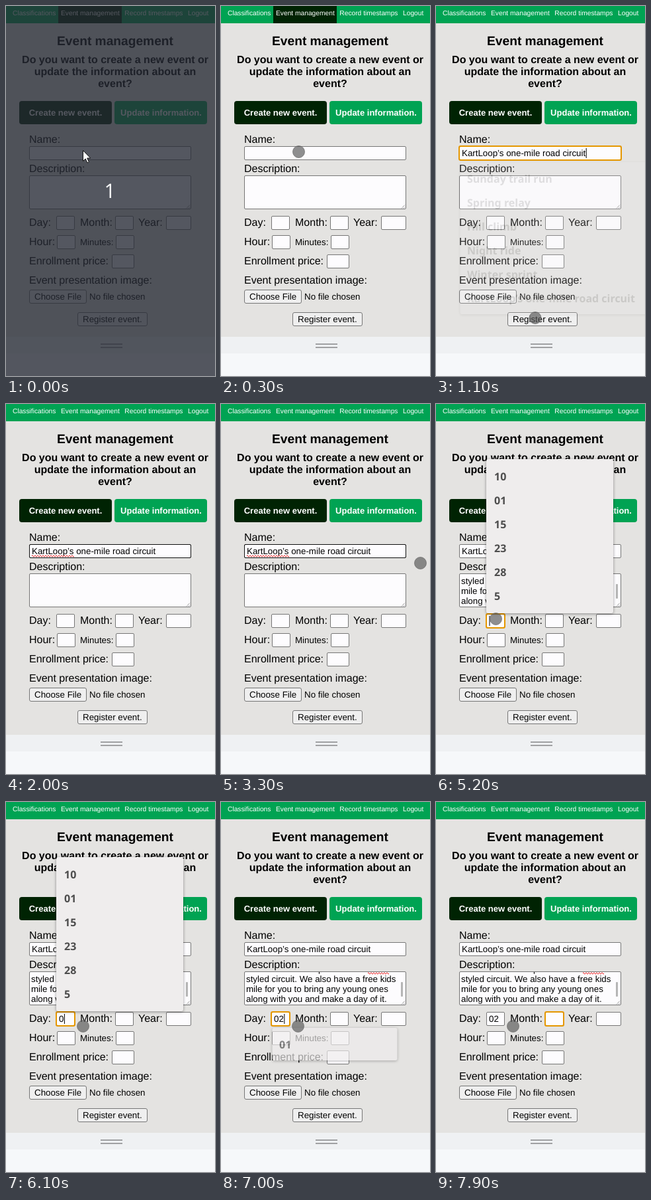
Write an HTML page that moves like this. It is 316x557 px and loops after 8 s.

```html
<!DOCTYPE html>
<html lang="en">
<head>
<meta charset="utf-8">
<title>Event management</title>
<style>
html, body { margin: 0; width: 316px; height: 557px; overflow: hidden; background: #e4e3e1; }
svg { display: block; font: 13.333px "Liberation Sans", Arial, sans-serif; text-rendering: geometricPrecision; }
.nav { font-size: 10.24px; fill: #fff; }
.head { font-size: 16px; font-weight: bold; text-anchor: middle; }
.tab { font-size: 13px; font-weight: bold; fill: #fff; text-anchor: middle; }
.label { font-size: 16px; }
.field rect { fill: #fdfcfe; stroke: #767676; }
.button rect { fill: #efefef; stroke: #767676; }
.list text { font: 600 16px "Noto Sans", "Open Sans", sans-serif; fill: #4d4d4d; }
.list rect { fill: #efeded; filter: drop-shadow(0 1px 2px #0006); }
.ring { fill: none; stroke: #e59700; stroke-width: 2; }
.ring.idle { stroke: #101010; stroke-width: 1; }
.touch { fill: #555; fill-opacity: .66; stroke: #666; stroke-opacity: .7; }
.count { font: 30px "Open Sans", "Noto Sans", sans-serif; fill: #fff; text-anchor: middle; }
</style>
</head>
<body>
<svg width="316" height="557" viewBox="0 0 316 557">
  <defs><clipPath id="area"><rect x="36" y="256" width="243" height="49"/></clipPath></defs>
  <rect width="316" height="557" fill="#e4e3e1"/>
  <rect width="316" height="26" fill="#00a353"/>
  <rect id="hover" x="79" width="96" height="26" fill="#002303"/>
  <g class="nav">
    <text x="10" y="14">Classifications</text>
    <text x="83" y="14">Event management</text>
    <text x="179.3" y="14">Record timestamps</text>
    <text x="275" y="14">Logout</text>
  </g>
  <g class="head">
    <text x="165" y="59" font-size="19.2">Event management</text>
    <text x="165" y="86">Do you want to create a new event or</text>
    <text x="165" y="104">update the information about an</text>
    <text x="165" y="122">event?</text>
  </g>
  <rect x="20" y="143" width="140" height="35" rx="4" fill="#002303"/>
  <rect x="164" y="143" width="140" height="35" rx="4" fill="#00a353"/>
  <g class="tab">
    <text x="90" y="165">Create new event.</text>
    <text x="234.5" y="165">Update information.</text>
  </g>
  <g class="label">
    <text x="35" y="206">Name:</text>
    <text x="35" y="250">Description:</text>
    <text x="35" y="331">Day:</text>
    <text x="112" y="331">Month:</text>
    <text x="200" y="331">Year:</text>
    <text x="35" y="360">Hour:</text>
    <text x="35" y="389">Enrollment price:</text>
    <text x="35" y="418">Event presentation image:</text>
  </g>
  <text x="112" y="360">Minutes:</text>
  <g class="field" id="fields"></g>
  <path d="M273 304.500l5-5M276 304.500l2-2" stroke="#999"/>
  <g class="button">
    <rect x="35.500" y="427.500" width="86" height="20" rx="2.500"/>
    <rect x="108.500" y="461.500" width="105" height="20" rx="2.500"/>
  </g>
  <text x="43" y="442">Choose File</text>
  <text x="126" y="442">No file chosen</text>
  <text x="116" y="476">Register event.</text>
  <rect y="498" width="316" height="25" fill="#eff1f3"/>
  <rect y="523" width="316" height="34" fill="#f6f8fa"/>
  <path d="M143 509h33M143 514h33" stroke="#a0a1a3" stroke-width="2"/>
  <g id="live"></g>
</svg>
<script>
const LOOP = 8000, TICK = 100, LINE = 15;
const box = (x, y, w, h = 21) => ({ x, y, w, h });
const inRow = (row, x, w = 28) => box(x, 316 + 29 * row, w);
const fields = {
  name: box(35, 211, 245), about: box(35, 255, 245, 51),
  day: inRow(0, 76), month: inRow(0, 165), year: inRow(0, 242, 38),
  hour: inRow(1, 77), minutes: inRow(1, 166), price: inRow(2, 160, 34)
};
const title = "KartLoop’s one-mile road circuit";
const about = `styled circuit. We also have a free kids
mile for you to bring any young ones
along with you and make a day of it.`;
const events = ["Sunday trail run", "Spring relay", "Hill climb", "Night ride", "Winter sprint", title];
const days = ["10", "01", "15", "23", "28", "5"];

// Each edit focuses a field and may set its text.
const edits = [[600, "name"], [1000, "name", title], [3500, "name"], [3800, "about"],
  [3900, "about", about], [5200, "day"], [6100, "day", "0"], [7000, "day", "02"], [7400, "month"]];
const taps = [[300, 117.5, 219.5], [600, 150, 469.5], [3300, 301.5, 239.5], [3600, 176.5, 265.5],
  [4400, 89.5, 346.5], [4700, 90, 337.5], [5200, 90.5, 323.5], [5800, 116.5, 337.5]];

const el = id => document.getElementById(id);
const during = (t, from, to) => t >= from && t < to;
const rect = (x, y, w, h, more = "") => `<rect x="${x}" y="${y}" width="${w}" height="${h}" ${more}/>`;
const text = (x, y, s, more = "") => `<text x="${x}" y="${y}" ${more}>${s}</text>`;

const pen = document.createElement("canvas").getContext("2d");
pen.font = '13.333px "Liberation Sans", Arial, sans-serif';
const widthOf = s => pen.measureText(s).width;

// Text starts a little closer to the edges in the multi-line field.
const origin = (name, { x, y } = fields[name]) =>
  name === "about" ? [x + 3, y + 16] : [x + 4, y + 15];

function lines(name, value) {
  const [x, y] = origin(name);
  return value.split("\n").map((s, i) => text(x, y + LINE * i, s)).join("");
}

function caret(name, value) {
  const [x, y] = origin(name), rows = value.split("\n");
  return rect(x + widthOf(rows.at(-1)) + .5, y - 12 + LINE * (rows.length - 1), 1, LINE);
}

function squiggle(x, y, w) {
  const waves = "q1 -2.500 2 0t2 0".repeat(Math.round(w / 4));
  return `<path d="M${x} ${y}${waves}" fill="none" stroke="#e33"/>`;
}

function ring({ x, y, w, h }, idle) {
  return idle
    ? rect(x + .5, y + .5, w - 1, h - 1, 'rx="1.500" class="ring idle"')
    : rect(x, y, w, h, 'rx="2" class="ring"');
}

// A suggestion list stays solid, then fades out quickly.
function list(t, start, close, field, items, { w = 192, above = false } = {}) {
  const opacity = t < start ? 0 : t < close ? 1 : Math.max(0, .67 - (t - close) / 200);
  if (!opacity) return "";
  const h = 36 * items.length + 16, inset = opacity < 1 ? 1.5 : 0;
  const y = above ? field.y - 1 - h : field.y + field.h + 1.5;
  return `<g class="list" opacity="${opacity}">` +
    rect(field.x + inset, y + inset, w - 2 * inset, h - 2 * inset, 'rx="3"') +
    items.map((s, i) => text(field.x + 12, y + 32 + 36 * i, s)).join("") + "</g>";
}

function description(value, checked) {
  return '<g clip-path="url(#area)">' + text(147, 256, "p") + lines("about", value) +
    (checked ? squiggle(222, 258, 30) : "") + "</g>" + rect(272, 271, 3, 22, 'rx="1" fill="#b5b5b5"');
}

function inputs(t) {
  const away = during(t, 1700, 3500), values = {};
  let s = "", since, active;
  for (const [time, name, value] of edits) {
    if (time > t) break;
    [since, active] = [time, name];
    if (value) values[name] = value;
  }
  for (const [name, value] of Object.entries(values))
    s += name === "about" ? description(value, active !== name) : lines(name, value);
  if (away && t >= 2000) s += squiggle(39, 229, widthOf(title.split(" ")[0]));
  if (active) s += ring(fields[active], away);
  if (active && !away && (t - since) % 1000 < 500) s += caret(active, values[active] || "");
  return s;
}

function touch(t) {
  const tap = taps.findLast(([time]) => time <= t);
  if (!tap || during(t, 1700, 3300)) return "";
  return `<circle class="touch" cx="${tap[1]}" cy="${tap[2]}" r="9"/>`;
}

const countdown = rect(0, 0, 316, 557, 'fill="#262a34" opacity=".78"') +
  text(157, 289, "1", 'class="count"') +
  '<path d="M116.500 217.500v16l3.700-3.500 2.800 6 2.400-1.100-2.700-5.900h5z" fill="#fff" stroke="#111"/>';

function scene(t) {
  let s = inputs(t) + list(t, 600, 1000, fields.name, events, { w: 286 });
  if (t < 6300) s += list(t, 5200, 6300, fields.day, days, { above: true });
  s += list(t, 6300, 7000, fields.day, ["01"]) + touch(t);
  return t < 300 ? s + countdown : s;
}

el("fields").innerHTML = Object.values(fields)
  .map(({ x, y, w, h }) => rect(x + .5, y + .5, w - 1, h - 1, 'rx="1.500"')).join("");

let last;
function draw(now) {
  const t = Math.floor(now % LOOP / TICK) * TICK, s = scene(t);
  if (s !== last) el("live").innerHTML = last = s;
  el("hover").style.visibility = t < 600 ? "visible" : "hidden";
  requestAnimationFrame(draw);
}
draw(0);
</script>
</body>
</html>
```
